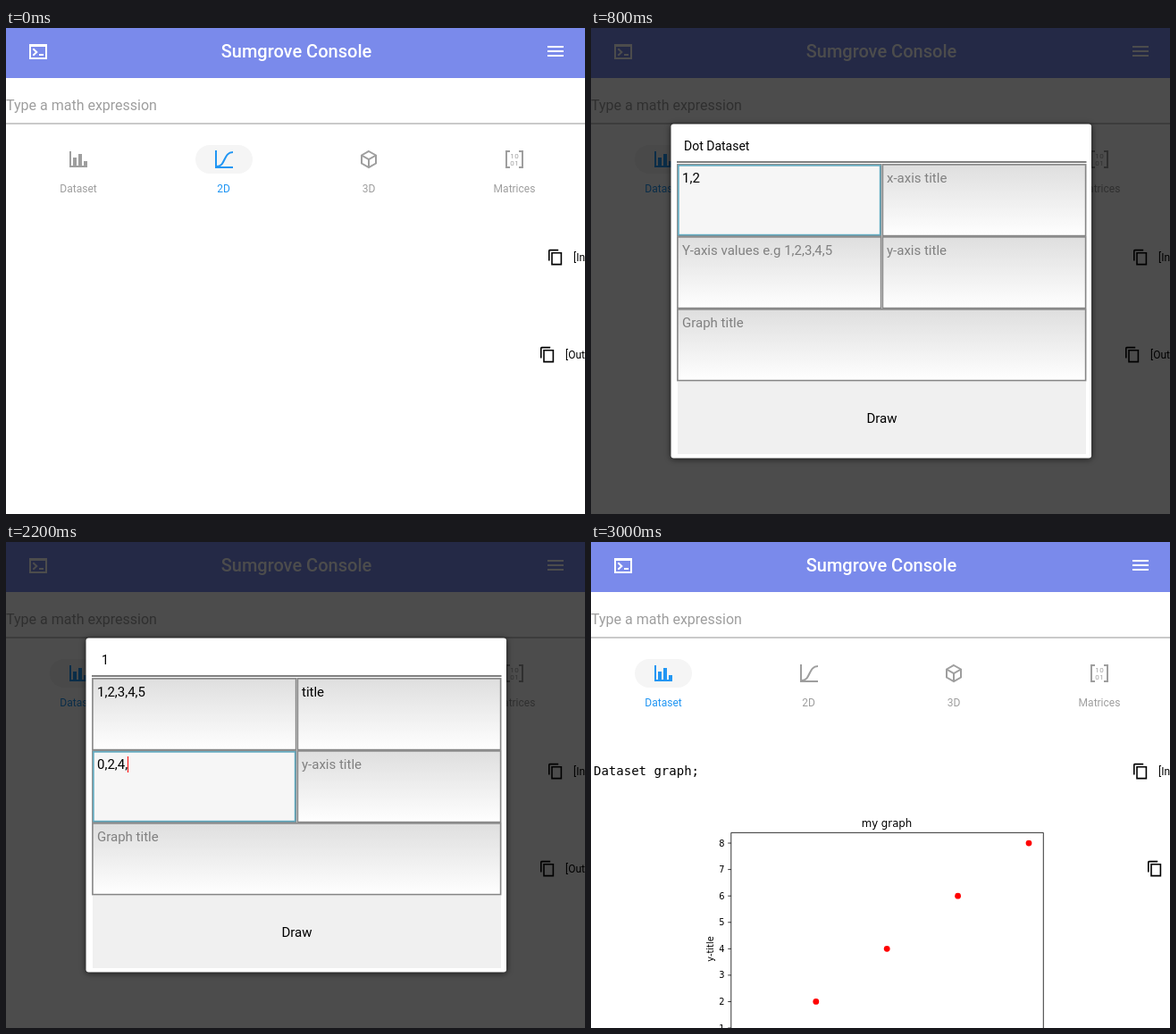
Animation of 648 by 544 pixels, one loop 3.2 s. Source, as an HTML page with a canvas:

```html
<!DOCTYPE html>
<html lang="en">
<head>
<meta charset="utf-8">
<title>Dot dataset demo</title>
<style>
html, body { margin: 0; width: 100%; height: 100%; overflow: hidden; background: #fff; }
canvas { display: block; }
</style>
</head>
<body>
<canvas width="648" height="544"></canvas>
<script>
const ctx = document.querySelector('canvas').getContext('2d');
const LOOP = 3200, STEP = 200;
const GREY = '#9e9e9e', BLUE = '#2196f3';
const SANS = 'Roboto, sans-serif', PLOT = '"DejaVu Sans", sans-serif';
const MONO = '"DejaVu Sans Mono", monospace';

function text(str, x, y, size, color = '#000', align = 'left', family = SANS, weight = 400) {
  ctx.font = `${weight} ${size}px ${family}`;
  ctx.fillStyle = color;
  ctx.textAlign = align;
  ctx.fillText(str, x, y);
}

function rect(x, y, w, h, color) {
  ctx.fillStyle = color;
  ctx.fillRect(x, y, w, h);
}

function round(x, y, w, h, r, color) {
  ctx.fillStyle = color;
  ctx.beginPath();
  ctx.roundRect(x, y, w, h, r);
  ctx.fill();
}

function line(path, x, y, color, width = 2, scale = 1) {
  ctx.save();
  ctx.translate(x, y);
  ctx.scale(scale, scale);
  ctx.strokeStyle = color;
  ctx.lineWidth = width;
  ctx.stroke(new Path2D(path));
  ctx.restore();
}

const copyIcon = (x, y) =>
  line('M7 6H20V22H7ZM3 17V3Q3 2 4 2H16', x, y, '#000', 2, 0.8);

// Tabs: label, centre and icon painter (24 px grid)
const tabs = [
  ['Dataset', 81, (x, y, c) => {
    ctx.save();
    ctx.translate(x, y);
    ctx.fillStyle = c;
    ctx.fill(new Path2D('M22 21H2V3H4V19H6V10H10V19H12V6H16V19H18V14H22Z'));
    ctx.restore();
  }],
  ['2D', 243.5, (x, y, c) => line('M3 2V21H22M4 20C14 20 11 4 22 4', Math.round(x), y, c)],
  ['3D', 406, (x, y, c) =>
    line('M12 3L20 7.5V16.5L12 21L4 16.5V7.5ZM4 7.5L12 12L20 7.5M12 12V21', x, y, c)],
  ['Matrices', 569, (x, y, c) => {
    line('M7 3H3V21H7M17 3H21V21H17', x, y, c);
    ['10', '01'].forEach((row, j) => [...row].forEach((d, i) =>
      text(d, x + 9.5 + 5 * i, y + 11 + 8 * j, 8, c, 'center')));
  }],
];

function page(active, done) {
  rect(0, 0, 648, 544, '#fff');
  rect(0, 0, 648, 56, '#7a8aeb');
  line('M3 5H21V20H3ZM3 6H21M6.3 9.3L10.3 13L6.3 16.7M13 16H18', 24, 14, '#fff');
  text('Sumgrove Console', 325, 33, 20, '#fff', 'center', SANS, 500);
  for (const y of [20, 25, 30]) rect(606, y, 18, 2, '#fff');
  text('Type a math expression', 0, 92, 16, GREY);
  rect(0, 106, 648, 2, '#cacaca');

  tabs.forEach(([label, x, icon], i) => {
    const color = i === active ? BLUE : GREY;
    if (i === active) round(Math.floor(x) - 32 + (i > 0), 131, 64, 32, 16, '#f5f5f5');
    icon(x - 12, 135, color);
    text(label, x, 184, 12, color, 'center');
  });

  copyIcon(605.4, 247);
  text('[In', 635, 261, 12);
  if (done) {
    text('Dataset graph;', 3, 261, 14, '#000', 'left', MONO);
    copyIcon(621.4, 356);
    plot();
  } else {
    copyIcon(596.4, 356);
    text('[Out', 626, 370, 12);
  }
}

function plot() {
  const px = v => 93 + 79.4 * v, py = v => 573.6 - 29.57 * v;
  text('my graph', 331, 319, 11.75, '#000', 'center', PLOT);
  line('M0 300V0H349.5V300', 156.8, 325.4, '#000', 0.8);
  for (let v = 1; v <= 8; v++) {
    line('M0 0H-3.5', 156.8, py(v), '#000', 0.8);
    text(v, 149.5, py(v) + 3.6, 9.8, '#000', 'right', PLOT);
  }
  ctx.save();
  ctx.translate(136.5, 455.5);
  ctx.rotate(-Math.PI / 2);
  text('y-title', 0, 0, 9.8, '#000', 'center', PLOT);
  ctx.restore();
  ctx.fillStyle = '#f00';
  for (let v = 2; v <= 5; v++) {
    ctx.beginPath();
    ctx.arc(px(v), py(2 * v - 2), 3.4, 0, 7);
    ctx.fill();
  }
}

// Fields: x, y, width, placeholder
const fields = [
  [96, 152, 229.5, 'X-axis values e.g 1,2,3,4,5'],
  [325.5, 152, 229, 'x-axis title'],
  [96, 233, 229.5, 'Y-axis values e.g 1,2,3,4,5'],
  [325.5, 233, 229, 'y-axis title'],
  [96, 314, 458.5, 'Graph title'],
];

// Typing from step 3 on: field, content, caret visible
const typing = [
  [0, '1', 1], [0, '1,2', 0], [0, '1,2,3,', 0], [0, '1,2,3,4,', 1], [0, '1,2,3,4,5', 1],
  [1, 'title', 1],
  [2, '0,', 0], [2, '0,2,', 1], [2, '0,2,4,', 1], [2, '0,2,4,6,8', 0],
  [3, 'y-title', 1],
  [4, 'my graph', 1],
];
const countdown = { 9: '3', 10: '2', 11: '1' };

function field([x, y, w, hint], value, focused, caret) {
  const h = 81.5, tx = Math.floor(x) + 6;
  const shade = ctx.createLinearGradient(0, y, 0, y + h);
  shade.addColorStop(0, '#dedede');
  shade.addColorStop(1, '#fff');
  rect(x, y, w, h, focused ? '#f6f6f6' : shade);
  ctx.strokeStyle = '#868686';
  ctx.lineWidth = 1.6;
  ctx.strokeRect(x + 0.9, y + 0.9, w - 1.8, h - 1.8);
  if (focused) {
    ctx.strokeStyle = '#5fa9bf';
    ctx.strokeRect(x + 1.9, y + 1.9, w - 3.8, h - 3.8);
  }
  if (value) text(value, tx, y + 21, 15);
  else text(hint, tx, y + 21, 15, '#808080');
  if (caret) rect(tx + Math.round(ctx.measureText(value).width), y + 7, 1, 18, '#f00');
}

function dialog(step) {
  rect(0, 0, 648, 544, 'rgba(0,0,0,.7)');
  ctx.save();
  ctx.shadowColor = 'rgba(0,0,0,.7)';
  ctx.shadowBlur = 7;
  ctx.shadowOffsetY = 1;
  round(89.5, 107.5, 470.5, 374, 3, '#fff');
  ctx.restore();
  if (countdown[step]) text(countdown[step], 107, 137, 14);
  else text('Dot Dataset', 104, 137, 14);
  rect(96, 149, 458.5, 2, '#808080');

  const typed = typing.slice(0, step - 2), values = [];
  for (const [i, value] of typed) values[i] = value;
  const [focus, , caret] = typed.at(-1) || [];
  fields.forEach((f, i) => field(f, values[i], i === focus, i === focus && caret));

  rect(97, 396, 457, 81, '#f0f0f0');
  text('Draw', 325.5, 442, 15, '#000', 'center');
}

function draw() {
  const step = Math.floor(performance.now() % LOOP / STEP);
  page(step ? 0 : 1, step === 15);
  if (step > 1 && step < 15) dialog(step);
  requestAnimationFrame(draw);
}
draw();
</script>
</body>
</html>
```
